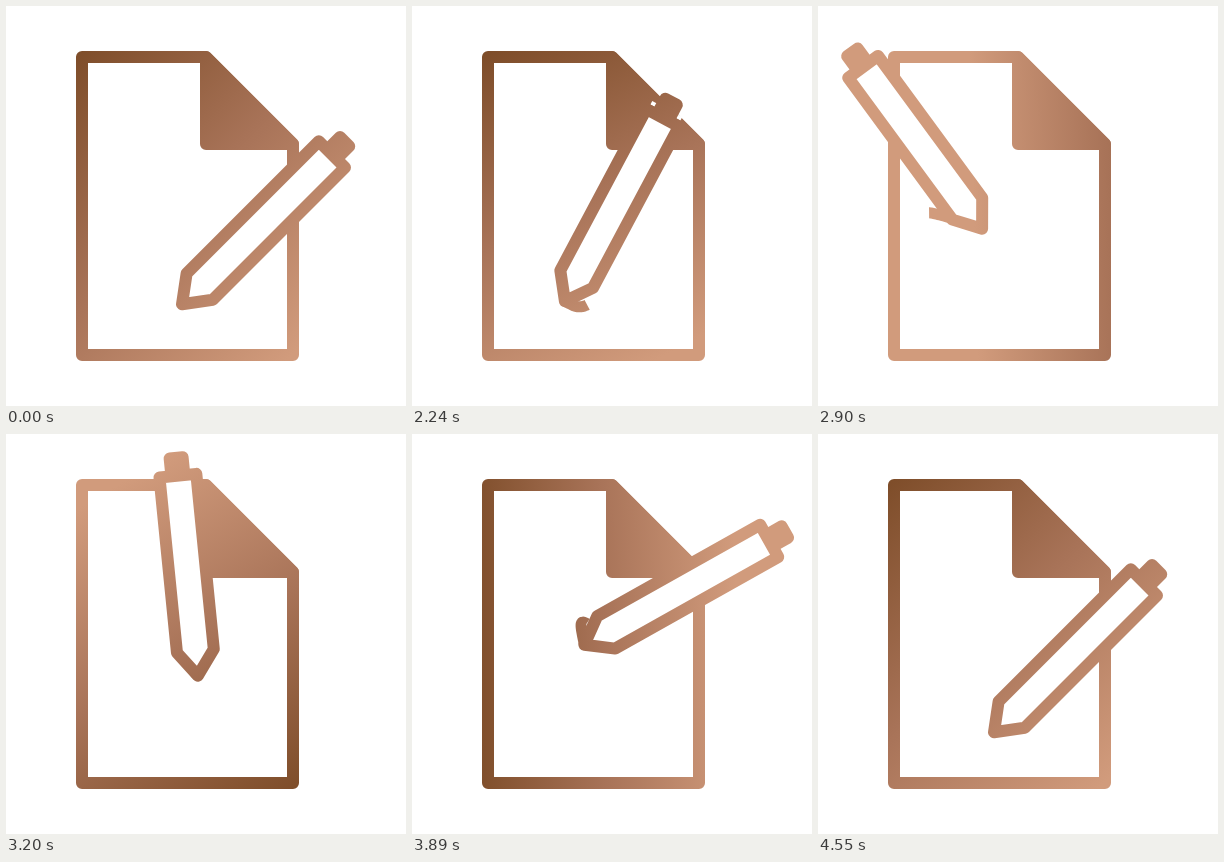
An HTML page with a canvas that plays this animation: 400x400 px, repeating every 4.58 s.

```html
<!DOCTYPE html>
<html>
<head>
<meta charset="utf-8">
<style>
  html, body { margin: 0; overflow: hidden; background: #fff; }
  canvas { display: block; }
</style>
</head>
<body>
<canvas id="stage" width="400" height="400"></canvas>
<script>
const ctx = document.getElementById('stage').getContext('2d');
const LOOP = 4580, REST = 2000, MOVE = 2550, STEP = 30, TRAIL = 200;

// The written stroke, evenly spaced in time: tip x, tip y, pen angle in degrees.
const stroke = [
  [176, 298.3, 45], [160, 299, 33], [124, 271, 6.5], [109, 215, -19],
  [122, 209, -33.5], [190, 233, -34], [190, 240, -9], [212, 254, 21],
  [188, 205, 51], [169.5, 189, 57], [175, 228, 62], [175, 277, 61],
  [169, 296, 54], [176, 298.3, 45]
];

// Catmull-Rom curve; mirrored at the ends so the pen starts and stops at rest.
function poseAt(t) {
  const last = stroke.length - 1;
  const pos = t / MOVE * last, i = Math.min(last - 1, Math.floor(pos)), u = pos - i;
  const key = k => stroke[last - Math.abs(last - Math.abs(k))];
  const [a, b, c, d] = [-1, 0, 1, 2].map(k => key(i + k));
  return b.map((v, n) => v + u / 2 * (c[n] - a[n] +
    u * (2 * a[n] - 5 * v + 4 * c[n] - d[n] + u * (3 * (v - c[n]) + d[n] - a[n]))));
}

// The dark side circles the page once, from the top left corner.
function setShade(t) {
  const u = (t / MOVE) ** 0.85;
  const turn = Math.PI * (2 * u * u * (3 - 2 * u) - 0.25);
  const dx = Math.sin(turn), dy = -Math.cos(turn);
  const half = 131 * (Math.abs(dx) + Math.abs(dy));
  const cx = 190 + 100 * Math.max(0, dx), cy = 183;
  const shade = ctx.createLinearGradient(cx + dx * half, cy + dy * half, cx - dx * half, cy - dy * half);
  shade.addColorStop(0, '#7d4c28');
  shade.addColorStop(0.5, '#a87358');
  shade.addColorStop(1, '#d19b7c');
  ctx.fillStyle = ctx.strokeStyle = shade;
}

function trace(points, width, close = true) {
  ctx.lineWidth = width;
  ctx.beginPath();
  points.forEach(([x, y]) => ctx.lineTo(x, y));
  if (close) ctx.closePath();
}

function drawPage() {
  trace([[76, 51], [200, 51], [287, 138], [287, 349], [76, 349]], 12);
  ctx.stroke();
  trace([[200, 51], [287, 138], [200, 138]], 12);
  ctx.fill();
  ctx.stroke();
}

function drawTrail(t) {
  const from = Math.max(0, t - Math.min(TRAIL, (MOVE - t) * 0.7));
  const points = Array.from({ length: 25 }, (_, k) => poseAt(from + (t - from) * k / 24));
  trace(points, 11, false);
  ctx.stroke();
}

function drawPen(t) {
  const [x, y, angle] = poseAt(t);
  const turn = angle * Math.PI / 180, cos = Math.cos(turn), sin = Math.sin(turn);
  // The body looks shorter when it stands upright or leans left.
  const top = -201 - 11 * Math.min(1, Math.max(0, angle / 45));
  // Points are turned here so the shading stays fixed to the stage.
  const place = points => points.map(([px, py]) => [x + px * cos - py * sin, y + px * sin + py * cos]);
  const shade = ctx.strokeStyle;

  ctx.strokeStyle = '#fff';
  trace(place([[-17, top - 8], [17, top - 8]]), 4, false);
  ctx.stroke();

  ctx.strokeStyle = shade;
  trace(place([[-6.5, top], [-6.5, top - 18], [6.5, top - 18], [6.5, top]]), 12);
  ctx.fill();
  ctx.stroke();

  ctx.fillStyle = '#fff';
  trace(place([[0, 0], [-18.5, -25], [-18.5, top], [18.5, top], [18.5, -25]]), 12);
  ctx.fill();
  ctx.stroke();
}

function draw() {
  const time = performance.now() % LOOP;
  const t = Math.max(0, Math.floor((time - REST) / STEP) * STEP);
  ctx.fillStyle = '#fff';
  ctx.fillRect(0, 0, 400, 400);
  ctx.lineJoin = 'round';
  setShade(t);
  drawPage();
  drawTrail(t);
  drawPen(t);
  requestAnimationFrame(draw);
}
draw();
</script>
</body>
</html>
```
